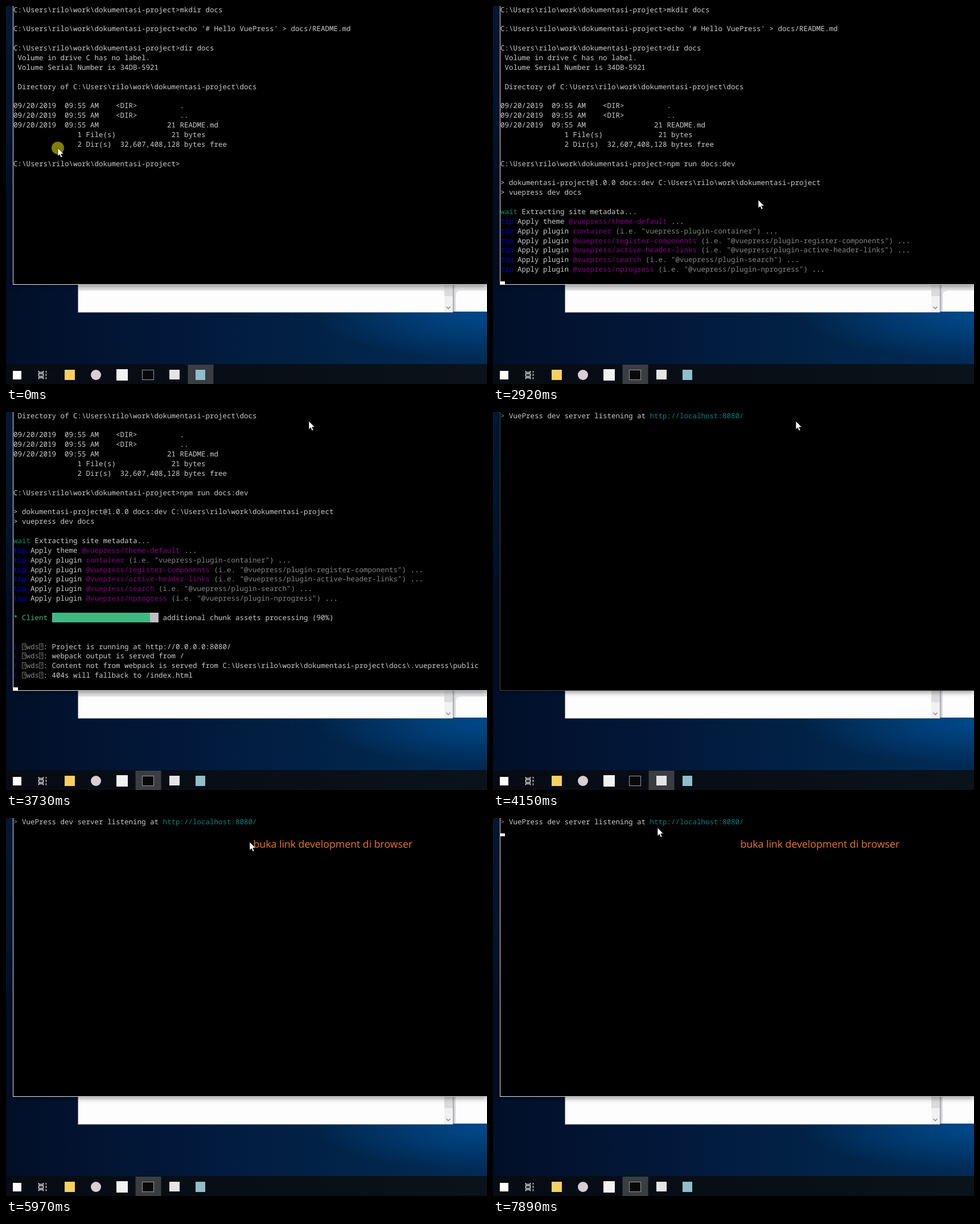
Write an HTML page that moves like this. It is 845 px wide and 663 px high and loops after 7.99 s.

```html
<!DOCTYPE html>
<html lang="id">
<head>
<meta charset="utf-8">
<style>
html, body { margin: 0; width: 100%; height: 100%; overflow: hidden; background: #020f26; }
#stage { position: relative; width: 100%; height: 100%; overflow: hidden; }
svg { position: absolute; left: 0; top: 0; width: 845px; height: 663px; }
#term {
  position: absolute; left: 12px; top: 0; width: 832px; height: 488px; overflow: hidden;
  background: #000; border: solid #e8e8e8; border-width: 0 0 1px 1px; box-shadow: 0 2px 9px #0007;
}
#term.idle { border-color: #484848; }
#out {
  position: absolute; left: 0; top: -1.5px; margin: 0; color: #ccc;
  font: 12.5px/16.875px "Noto Sans Mono", "DejaVu Sans Mono", monospace;
  text-rendering: geometricPrecision;
}
#caret { position: absolute; width: 7.5px; height: 5px; background: #fff; }
.b { color: #0000e0; } .n { color: #0000a0; } .m { color: #880088; } .t { color: #008484; }
.w { color: #0b8c70; } .d { color: #868686; } .g { color: #41b883; }
.full { background: #41b883; } .rest { background: #c4bcc2; }
</style>
</head>
<body>
<div id="stage">
<svg>
  <defs>
    <linearGradient id="floor">
      <stop stop-color="#020f28"/><stop offset=".35" stop-color="#02183a"/>
      <stop offset=".7" stop-color="#012448"/><stop offset="1" stop-color="#002b56"/>
    </linearGradient>
    <linearGradient id="side" x2="0" y2="1">
      <stop stop-color="#011a35"/><stop offset=".4" stop-color="#011730"/><stop offset=".7" stop-color="#020e25"/>
    </linearGradient>
    <radialGradient id="glow" cx="0" cy="0" r="1" gradientUnits="userSpaceOnUse"
      gradientTransform="translate(845 545) scale(300 75)">
      <stop stop-color="#00498a"/><stop offset="1" stop-color="#00498a" stop-opacity="0"/>
    </radialGradient>
    <linearGradient id="gap"><stop stop-color="#b4b8bd"/><stop offset="1" stop-color="#ececee"/></linearGradient>
    <linearGradient id="bar"><stop stop-color="#070b13"/><stop offset="1" stop-color="#0a121a"/></linearGradient>
  </defs>
  <path fill="url(#floor)" d="M0 480H845V630H0Z"/>
  <path fill="url(#glow)" d="M0 480H845V630H0Z"/>
  <path fill="url(#side)" d="M0 0H14V489H0Z"/>
  <path fill="#e4e5e7" d="M790 480H845V536H790Z"/>
  <path fill="url(#gap)" d="M785 480H791V536H785Z"/>
  <path id="page" fill="#fdfdfd"/>
  <path fill="#fdfdfd" stroke="#6f7782" d="M127 480H785V537.500H126.500V480"/>
  <path fill="#f1f1f1" d="M770 480H785V537H770Z"/>
  <path fill="#dcdcdc" d="M770 480H785V509H770Z"/>
  <path fill="none" stroke="#8a8a8a" stroke-width="1.5" d="M773.5 527.5l3.5 3.5 3.5-3.5"/>
  <path id="strip" fill="#e6e6e6" d="M127 480H770V499H127Z"/>
  <path fill="url(#bar)" d="M0 628H845V663H0Z"/>
  <rect id="task" y="629" width="45" height="34" fill="#3a3d42"/>
  <rect x="12" y="640" width="15" height="15" fill="#fff"/>
  <path fill="none" stroke="#e6e6e6" stroke-width="1.3"
    d="M57.5 640v2.5h8V640M57.5 654.5v-2.5h8v2.5M57.5 645h8v4.5h-8zM70.5 640v3M70.5 645v4M70.5 651v3.5"/>
  <rect x="103" y="638" width="18" height="18" fill="#f7d060"/>
  <circle cx="158" cy="647" r="9" fill="#d8cfd3"/>
  <rect x="194" y="637" width="20" height="20" fill="#f2f2f2"/>
  <rect x="239.5" y="638.5" width="20" height="17" fill="#080808" stroke="#9a9a9a"/>
  <rect x="287" y="638" width="18" height="17" fill="#e4e4e4"/>
  <rect x="333" y="638" width="17" height="18" fill="#8fbfc8"/>
</svg>
<div id="term"><pre id="out"></pre><div id="caret"></div></div>
<svg>
  <text id="note" x="434.5" y="52" fill="#ee7818" font-size="17.7" text-rendering="geometricPrecision"
    font-family="Open Sans, Noto Sans, sans-serif">buka link development di browser</text>
  <g id="mouse">
    <circle id="click" r="11" fill="#808000"/>
    <path fill="#fff" stroke="#000" stroke-width=".6" d="M0 0V14.5L3.3 11.4 5.6 16.8 8 15.8 5.7 10.6H10.3Z"/>
  </g>
</svg>
</div>
<script>
const LOOP = 7990, ROW = 16.875, COL = 7.5, ROWS = 28;
const $ = id => document.getElementById(id);
const paint = (cls, s) => `<span class="${cls}">${s}</span>`;
const dir = 'C:\\Users\\rilo\\work\\dokumentasi-project';

const history = [
  dir + '>mkdir docs', '',
  dir + ">echo '# Hello VuePress' > docs/README.md", '',
  dir + '>dir docs',
  ' Volume in drive C has no label.',
  ' Volume Serial Number is 34DB-5921', '',
  ' Directory of ' + dir + '\\docs', '',
  '09/20/2019  09:55 AM    &lt;DIR>          .',
  '09/20/2019  09:55 AM    &lt;DIR>          ..',
  '09/20/2019  09:55 AM                21 README.md',
  '               1 File(s)             21 bytes',
  '               2 Dir(s)  32,607,408,128 bytes free', ''
];

const command = 'npm run docs:dev';
const keyTimes = [620, 700, 770, 850, 910, 970, 1040, 1120, 1300, 1370, 1430, 1490, 1740, 1820, 1900, 1960];

const tip = (kind, name, pkg) => paint('b', 'tip') + ` Apply ${kind} ` + paint('m', name) +
  (pkg ? paint('d', ` (i.e. "${pkg}")`) : '') + ' ...';
const plugin = name => tip('plugin', '@vuepress/' + name, '@vuepress/plugin-' + name);
const wds = s => paint('n', 'i') + ' ' + paint('d', '⍰wds⍰') + ': ' + s;

function client(t) {
  const [pct, msg] = t >= 3830 ? [95, 'emitting']
    : t >= 3600 ? [90, 'additional chunk assets processing']
    : [10 + Math.floor((t - 2950) / 65) * 6, 'building'];
  const n = Math.round(pct / 4);
  return paint('g', '* Client ') + paint('full', ' '.repeat(n)) + paint('rest', ' '.repeat(25 - n)) + ` ${msg} (${pct}%)`;
}

const output = [
  [2190, ''],
  [2320, `> dokumentasi-project@1.0.0 docs:dev ${dir}`],
  [2320, '> vuepress dev docs'],
  [2320, ''],
  [2460, paint('w', 'wait') + ' Extracting site metadata...'],
  [2540, tip('theme', '@vuepress/theme-default')],
  [2610, tip('plugin', 'container', 'vuepress-plugin-container')],
  [2680, plugin('register-components')],
  [2750, plugin('active-header-links')],
  [2820, plugin('search')],
  [2880, plugin('nprogress')],
  [2950, ''], [2950, client], [2950, ''], [2950, ''],
  [3250, wds('Project is running at http://0.0.0.0:8080/')],
  [3250, wds('webpack output is served from /')],
  [3320, wds(`Content not from webpack is served from ${dir}\\docs\\.vuepress\\public`)],
  [3320, wds('404s will fallback to /index.html')]
];
const ready = paint('d', '>') + ' VuePress dev server listening at ' + paint('t', 'http://localhost:8080/');

// time, x, y of the pointer tip
const path = [
  [100, 91, 249], [560, 466, 340], [3050, 466, 340], [3700, 532, 16], [4310, 532, 16],
  [5010, 510, 66], [5110, 510, 66], [5740, 428, 42], [5940, 428, 42], [6700, 438, 20],
  [6830, 438, 20], [6950, 442, 18], [7300, 390, 11], [7590, 344, 17], [7640, 344, 17], [7890, 289, 17]
];
function pointer(t) {
  const i = path.findIndex(p => p[0] > t);
  if (i < 1) return path.at(i).slice(1);
  const [t0, x0, y0] = path[i - 1], [t1, x1, y1] = path[i];
  const u = (t - t0) / (t1 - t0), e = u * u * (3 - 2 * u);
  return [x0 + (x1 - x0) * e, y0 + (y1 - y0) * e];
}

function screen(t) {
  if (t >= 3900) return { lines: [ready], row: 1, col: 0 };
  const typed = command.slice(0, keyTimes.filter(k => k <= t).length);
  const shown = output.filter(o => o[0] <= t).map(o => typeof o[1] === 'function' ? o[1](t) : o[1]);
  const lines = [...history, dir + '>' + typed, ...shown];
  if (!shown.length) return { lines, row: 16, col: dir.length + 1 + typed.length };
  const scroll = Math.max(0, lines.length - ROWS);
  return { lines: lines.slice(scroll), row: lines.length - scroll, col: 0 };
}

const within = (t, a, b) => t >= a && t < b;
const show = (el, on) => { el.style.visibility = on ? 'visible' : 'hidden'; };
let last;

function draw(t) {
  const { lines, row, col } = screen(t);
  const html = lines.join('\n');
  if (html !== last) $('out').innerHTML = last = html;

  $('caret').style.left = col * COL + 'px';
  $('caret').style.top = Math.round(row * ROW + 10.3) + 'px';
  show($('caret'), within(t, 570, 1110) || within(t, 1740, 3900) || t >= 7400);

  const idle = within(t, 4080, 5940), late = t >= 4080;
  $('term').className = idle ? 'idle' : '';
  $('task').setAttribute('x', t < 160 ? 319.5 : idle ? 273.5 : 227.5);
  show($('strip'), !late);
  $('page').setAttribute('d', late ? 'M790 480H845V536H790Z' : 'M790 536V509Q790 499 800 499H845V536Z');
  show($('note'), t >= 4310);

  $('mouse').setAttribute('transform', `translate(${pointer(t).map(Math.round)})`);
  show($('click'), t < 100 || within(t, 5760, 5940));
}

const start = performance.now();
function tick() {
  draw((performance.now() - start) % LOOP);
  requestAnimationFrame(tick);
}
tick();
</script>
</body>
</html>
```
